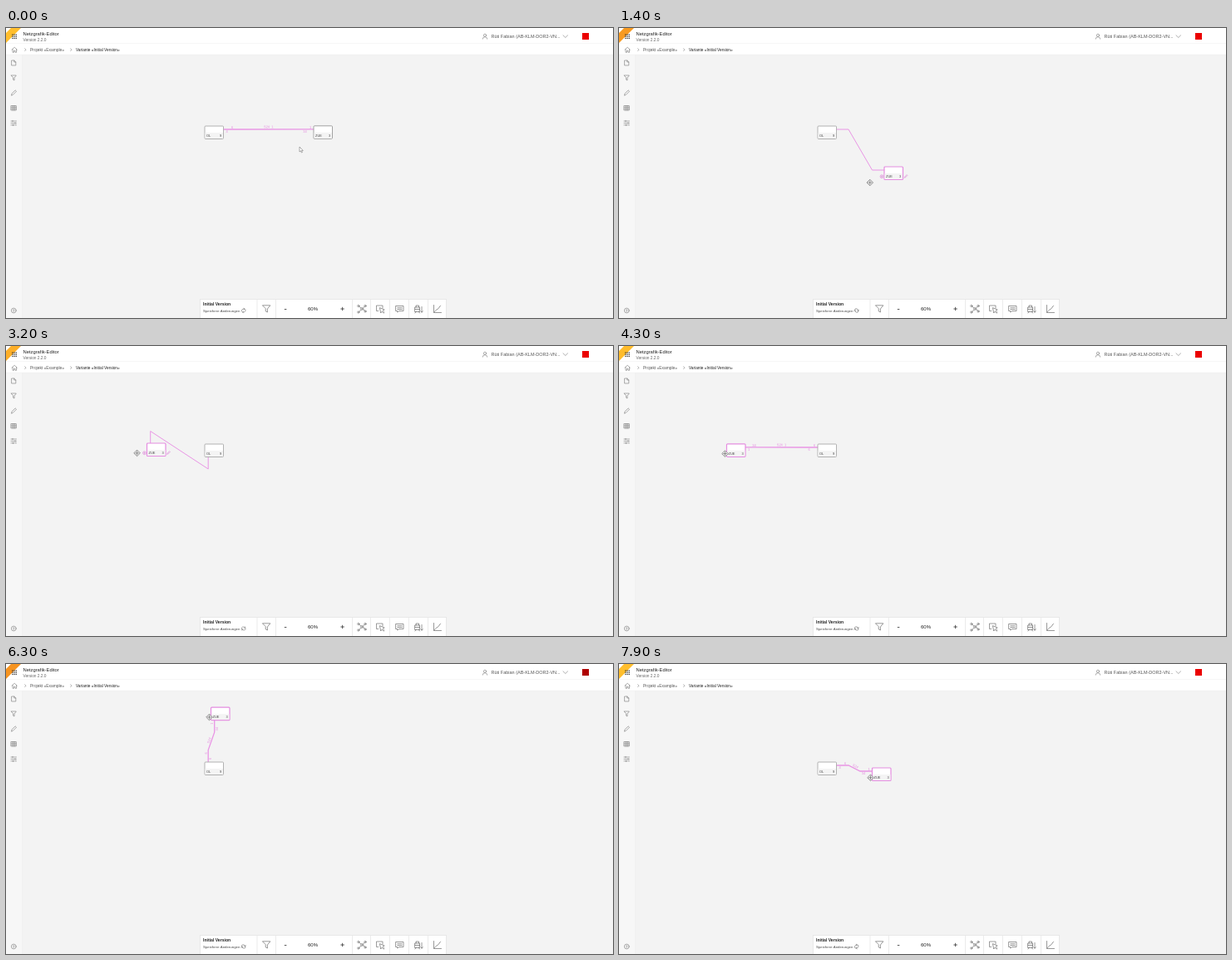
Recreate the animation shown at these times as an HTML page. Size 730 px wide and 349 px high, loop 8000 ms.

```html
<!DOCTYPE html>
<html lang="de">
<head>
<meta charset="utf-8">
<title>Netzgrafik-Editor</title>
<style>
  html, body { margin: 0; width: 100%; height: 100%; overflow: hidden; background: #f3f3f3; }
  svg { display: block; width: 100vw; height: 100vh; font-family: "Liberation Sans", Arial, sans-serif; }
  .icon { fill: none; stroke: #777; stroke-width: .6; stroke-linejoin: round; stroke-linecap: round; }
  .tools { stroke: #555; }
  .label { font-size: 4px; fill: #e58be0; text-anchor: middle; }
  .code { font-size: 4px; fill: #444; }
</style>
</head>
<body>
<svg viewBox="0 0 730 349">
  <rect width="730" height="349" fill="#f3f3f3"/>
  <rect y="32" width="19.5" height="317" fill="#f7f7f7"/>
  <rect width="730" height="32" fill="#fff"/>
  <path d="M0 18.500H730" stroke="#f3f3f3" stroke-width=".7"/>
  <path d="M0 32.200H730M19.500 32V349" stroke="#eee" stroke-width=".6" fill="none"/>
  <path id="ribbon" d="M0 6L6 0H18L0 18Z"/>

  <g fill="#222">
    <text x="20.500" y="9" font-size="5.800">Netzgrafik-Editor</text>
    <text x="20.500" y="16" font-size="4.800" fill="#666">Version 2.2.0</text>
    <text x="29" y="27.900" font-size="4.900" fill="#555">Projekt «Example»</text>
    <text x="84" y="27.900" font-size="4.800">Variante «Initial Version»</text>
    <text x="583.500" y="12.300" font-size="5.500" fill="#555">Rüti Fabian (AB-KLM-DOR2-VN...</text>
  </g>
  <rect id="logo" x="693" y="6" width="8" height="8"/>

  <g class="icon">
    <path d="M22.700 24.800l1.200 1.400-1.200 1.400M77.700 24.800l1.200 1.400-1.200 1.400"/>
    <path d="M7 26.200l3.200-3 3.200 3M8 25.500v3.800h1.500v-2h1.500v2h1.500v-3.800"/>
    <circle cx="576" cy="8.800" r="1.600"/><path d="M573.200 13.200q0-2.500 2.800-2.500t2.800 2.500M670 8.800l2.800 2.700 2.800-2.700"/>
    <path d="M7 39h2.800l2 2v4H7zM9.800 39v2h2"/>
    <path d="M6.300 57h6l-2.300 3v3l-1.400-.8V60z"/>
    <path d="M6.500 80.800l.6-2 4-4 1.400 1.400-4 4z"/>
    <path d="M6.300 93.500h6v5.500h-6zM6.300 95.300h6M6.300 97.200h6M8.300 93.500v5.500M10.300 93.500v5.500"/>
    <path d="M6 112h6.500M6 114.400h6.500M6 116.800h6.500M8 111.300v1.400M11 113.700v1.400M8.500 116.100v1.400"/>
    <circle cx="9.300" cy="340" r="2.900"/><path d="M8.500 339.200q.8-1.300 1.600 0l-.8 1.200v1"/>
  </g>
  <g id="menuDots" fill="#333"></g>

  <g id="network">
    <path id="edge" fill="none" stroke="#e995e5"/>
    <g id="labels"></g>
    <g id="fixedNode"></g>
    <g id="movingNode"></g>
    <g id="handles" fill="none" stroke="#dd8ad8" stroke-width=".7">
      <circle cx="-3" cy="11.700" r="1.900"/><path d="M-4 11.700h2M-3 10.700v2M24.200 13.300l.4-1.200 2.500-2.500.8.8-2.500 2.500z"/>
    </g>
  </g>
  <path id="arrow" d="M0 0V6L1.500 4.800 2.500 7 3.400 6.600 2.500 4.500H4.300Z" fill="#fff" stroke="#777" stroke-width=".6"/>
  <g id="mover" fill="#f5f5f5" stroke="#666" stroke-width=".7">
    <path d="M0-3.800L3.800 0 0 3.800-3.800 0Z"/><path d="M0-2.500V2.500M-2.500 0H2.500"/>
  </g>

  <rect x="233.500" y="326.500" width="296" height="24" fill="#fff" stroke="#e4e4e4" stroke-width=".8"/>
  <path id="dividers" stroke="#e6e6e6" stroke-width=".8"/>
  <g fill="#222">
    <text x="237" y="333.600" font-size="5.100" font-weight="bold">Initial Version</text>
    <text x="237" y="341.600" font-size="4.350" fill="#444">Speichere Änderungen</text>
    <text x="369" y="340" font-size="6" text-anchor="middle">60%</text>
  </g>
  <path d="M334.800 338.500h2.600M402.400 338h4.400M404.600 335.800v4.400" stroke="#333" stroke-width=".8"/>
  <g id="spinner" class="icon"><path d="M-2.300 .4A2.200 1.700 0 0 1 1.800-1M2.300-.4A2.200 1.700 0 0 1-1.800 1M2-2V-.8H.8M-2 2V.8H-.8"/></g>
  <g class="icon tools">
    <path d="M308.800 333.800h9l-3.400 4.200v4l-2.200-1.200V338z"/>
    <path d="M424.500 335.200l7 5M424.500 341.500l7-6.500"/>
    <g fill="#fff"><circle cx="423.800" cy="334.500" r="1.100"/><circle cx="432" cy="334.500" r="1.100"/><circle cx="423.800" cy="342" r="1.100"/><circle cx="432" cy="341" r="1.100"/><circle cx="428" cy="338" r="1.300"/></g>
    <path d="M453 337v-3h-7.500v6.500h3" stroke-dasharray="1.200 .8"/><path d="M449.500 337l1.200 6 1.400-1.800 2 2 .9-.9-2-2 1.800-1.100z"/>
    <path d="M469 334.500h9v6h-5.500l-1.700 1.700v-1.700H469zM470.800 336.700h5.400M470.800 338.500h5.400"/>
    <path d="M492 336h5.500v5.500H492zM493 336v-2h3.500v2M492 338.500h5.500M493 341.500l-1 1.500M496.500 341.500l1 1.500M500 335.500v6.500M498.800 340.800l1.200 1.400 1.200-1.400"/>
    <path d="M514.500 333.500v9h9M514.800 342l3.200-3.200 1.500-.6 3-4"/>
  </g>
</svg>
<script>
const LOOP = 8000, STEP = 100, LAG = 125, STUB = 14.5, W = 22.5, H = 15.5;
const HOME = [239, 118];
const $ = id => document.getElementById(id);

// time, x, y of the dragged node
const route = [
  [0, 370, 117.8], [700, 370, 117.8], [1400, 319, 167], [2000, 241, 196], [2250, 235, 200], [2500, 235, 200],
  [3200, 169.5, 117], [3850, 129.5, 117.8], [4500, 129.5, 117.8], [5200, 237.5, 57],
  [5800, 246.5, 52.2], [6600, 246.5, 52.2], [7500, 304.5, 125], [8200, 304.5, 125]
];
// drag start, drag end, side of the fixed node used while dragging
const drags = [[700, 2250, 'right'], [2500, 3850, 'bottom'], [4500, 5800, 'left'], [6600, 7500, 'top'], [9000, 9000, 'right']];
const opposite = { right: 'left', left: 'right', top: 'bottom', bottom: 'top' };
const outward = { right: [1, 0], left: [-1, 0], top: [0, -1], bottom: [0, 1] };

const slope = (i, k) => (route[i + 1][k] - route[i][k]) / (route[i + 1][0] - route[i][0]);
function tangent(i, k) {
  if (i === 0 || i === route.length - 1) return 0;
  const a = slope(i - 1, k), b = slope(i, k);
  return a * b > 0 ? 2 * a * b / (a + b) : 0;
}
function position(t) {
  let i = 0;
  while (i < route.length - 2 && t >= route[i + 1][0]) i++;
  const span = route[i + 1][0] - route[i][0];
  const u = Math.min(1, (t - route[i][0]) / span), v = 1 - u;
  return [1, 2].map(k =>
    v * v * (1 + 2 * u) * route[i][k] + u * u * (3 - 2 * u) * route[i + 1][k] +
    span * u * v * (v * tangent(i, k) - u * tangent(i + 1, k)));
}

const port = ([x, y], side) => ({
  right: [x + W, y + 4], left: [x, y + 4], top: [x + 4.2, y], bottom: [x + 4.2, y + H]
})[side];
const along = (p, d, n) => [p[0] + d[0] * n, p[1] + d[1] * n];
const move = (el, x, y) => el.setAttribute('transform', `translate(${x} ${y})`);
const show = (el, on) => el.setAttribute('visibility', on ? 'visible' : 'hidden');

function nodeMarkup(code, count) {
  return `<rect width="${W}" height="${H}" rx="1" fill="#fff" stroke="#aaa" stroke-width=".9"/>
    <path d="M.6 8H${W - .6}V${H - .6}H.6Z" fill="#f4f4f4"/>
    <text class="code" x="2" y="13.300">${code}</text><text class="code" x="18" y="13.300">${count}</text>`;
}
function label(text, [x, y], angle) {
  return `<text class="label" transform="translate(${x} ${y}) rotate(${angle})" y="1.400">${text}</text>`;
}
function upright(dx, dy) {
  const a = Math.atan2(dy, dx) * 180 / Math.PI;
  return a >= 90 ? a - 180 : a < -90 ? a + 180 : a;
}

function edgeLabels(ends, side) {
  const fixedFirst = side === 'right' || side === 'bottom';
  const [first, last] = fixedFirst ? ends : [ends[1], ends[0]];
  const d = first.dir, n = [d[1], -d[0]], turn = upright(...d);
  const at = (p, distance, offset) => along(along(p, d, distance), n, offset);
  const dx = last.bend[0] - first.bend[0], dy = last.bend[1] - first.bend[1];
  const angle = upright(dx, dy), r = angle * Math.PI / 180;
  const mid = along([(first.bend[0] + last.bend[0]) / 2, (first.bend[1] + last.bend[1]) / 2], [Math.sin(r), -Math.cos(r)], 3);
  return label(fixedFirst ? '6' : '34', at(first.port, 10.5, 2.7), turn) +
    label(fixedFirst ? '4' : '1', at(first.port, 4, -3), turn) +
    label(fixedFirst ? '1' : '6', at(last.port, -4, 2.7), turn) +
    label(fixedFirst ? '34' : '6', at(last.port, -10.5, -3), turn) +
    label(Math.hypot(dx, dy) > 40 ? 'S24 &#160;1' : 'S24', mid, angle);
}

function mix(a, b, k) {
  return `rgb(${a.map((v, i) => Math.round(v + (b[i] - v) * k))})`;
}

function draw(t) {
  const drag = drags.find(d => t < d[1]);
  const dragging = t >= drag[0], side = drag[2];
  const node = position(t);

  const ends = [[HOME, side], [node, opposite[side]]].map(([p, s]) => {
    const start = port(p, s), dir = outward[s];
    return { port: start, dir, bend: along(start, dir, STUB) };
  });
  const points = [ends[0].port, ends[0].bend, ends[1].bend, ends[1].port];
  $('edge').setAttribute('d', 'M' + points.join('L'));
  $('edge').setAttribute('stroke-width', dragging ? 1 : 1.3);
  $('labels').innerHTML = dragging ? '' : edgeLabels(ends, side);

  move($('movingNode'), ...node);
  const frame = $('movingNode').firstElementChild;
  frame.setAttribute('stroke', t < 600 ? '#999' : '#e48de0');
  frame.setAttribute('stroke-width', t < 600 ? .9 : 1.2);
  move($('handles'), ...node);
  show($('handles'), dragging);

  const ahead = position(t + LAG), approach = Math.min(1, t / 600);
  show($('arrow'), t < 600);
  show($('mover'), t >= 600);
  move($('arrow'), 353 + 14 * approach, 143 - 13 * approach);
  move($('mover'), ahead[0] - 2, ahead[1] + 11.8);

  $('ribbon').setAttribute('fill', mix([255, 190, 45], [245, 145, 30], (1 - Math.cos(t * Math.PI / 2000)) / 2));
  $('logo').setAttribute('fill', mix([235, 0, 0], [175, 0, 0], Math.exp(-(((t - 6300) / 700) ** 2))));
  $('spinner').setAttribute('transform', `translate(285.700 340) rotate(${t * .18 - 36})`);
}

$('fixedNode').innerHTML = nodeMarkup('OL', 9);
$('movingNode').innerHTML = nodeMarkup('ZUE', 3);
move($('fixedNode'), ...HOME);
$('dividers').setAttribute('d', [302, 324.5, 416.5, 438.5, 461.5, 484.5, 507.5].map(x => `M${x} 327V349`).join(''));
$('menuDots').innerHTML = [0, 1, 2, 3, 4, 5, 6, 7, 8].map(i =>
  `<rect x="${7.2 + i % 3 * 2.2}" y="${7.4 + Math.floor(i / 3) * 2.2}" width="1.300" height="1.300"/>`).join('');

const begin = performance.now();
function tick() {
  const t = (performance.now() - begin) % LOOP;
  draw(Math.floor(t / STEP) * STEP);
  requestAnimationFrame(tick);
}
tick();
</script>
</body>
</html>
```
